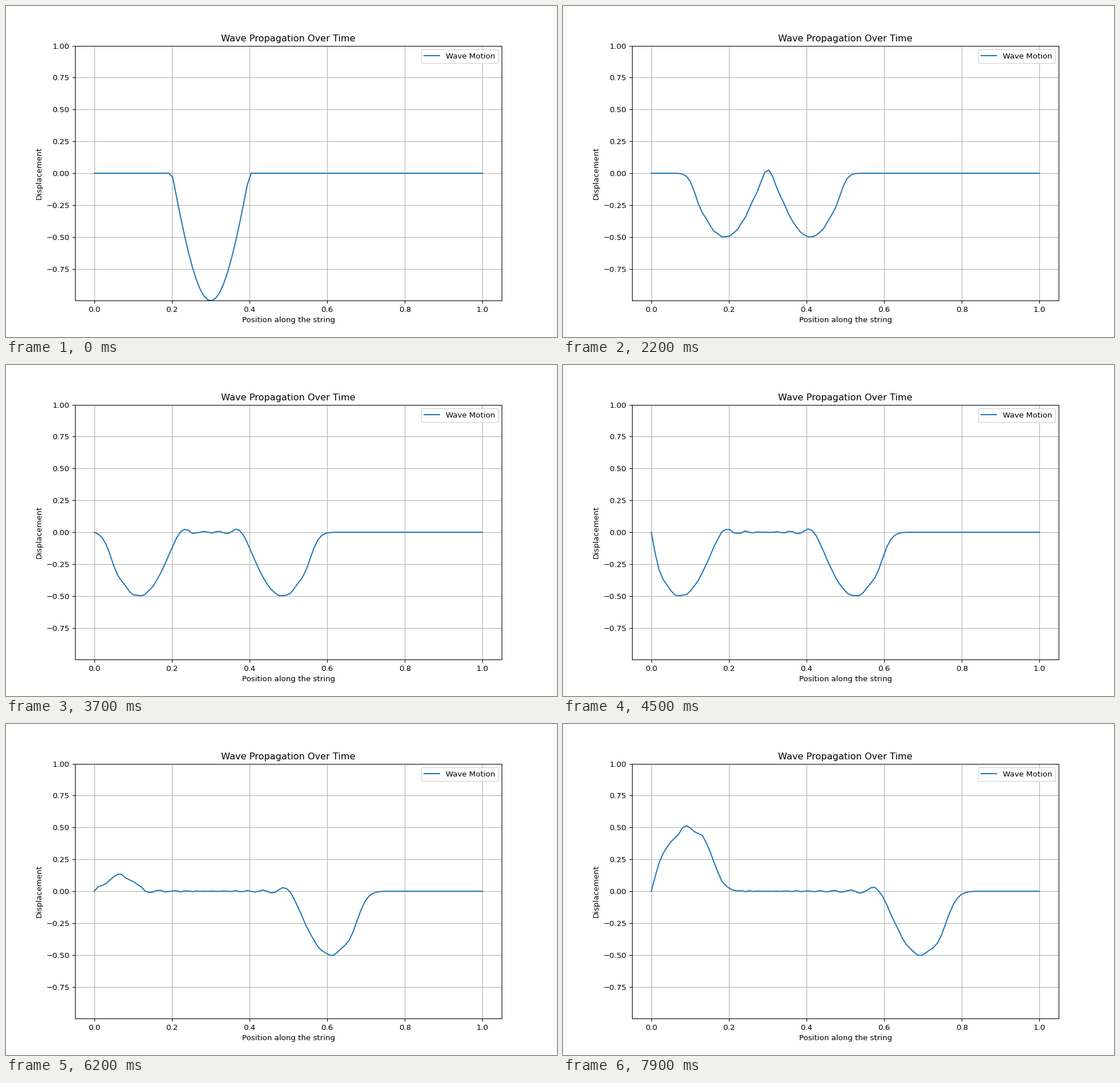
These frames come from a looping animation (966x580 px, 8 s). A matplotlib script:

```python
import numpy as np
import matplotlib.pyplot as plt
from matplotlib.animation import FuncAnimation

WIDTH, HEIGHT, DPI = 966, 580, 96.6
POINTS, FRAMES = 100, 80
SPEED, DT, SUBSTEPS = 1.0, 0.001, 5

x = np.linspace(0, 1, POINTS)
r2 = (SPEED * DT / (x[1] - x[0])) ** 2


def bend(u):
    """Second difference with both ends held still."""
    d = np.zeros_like(u)
    d[1:-1] = u[2:] - 2 * u[1:-1] + u[:-2]
    return d


# Explicit finite-difference solution of the wave equation, released at rest
steps = FRAMES * SUBSTEPS
u = np.zeros((steps, POINTS))
u[0] = np.where((x >= 0.2) & (x <= 0.4), np.sin(5 * np.pi * x), 0)
u[1] = u[0] + 0.5 * r2 * bend(u[0])
for n in range(1, steps - 1):
    u[n + 1] = 2 * u[n] - u[n - 1] + r2 * bend(u[n])
waves = u[::SUBSTEPS]

# The small margin keeps the pixel size from rounding down
fig, ax = plt.subplots(figsize=((WIDTH + 0.01) / DPI, (HEIGHT + 0.01) / DPI),
                       dpi=DPI)
line, = ax.plot(x, waves[0], label="Wave Motion")
ax.set_xlim(-0.05, 1.05)
ax.set_ylim(waves[0].min(), 1)
ax.set_xlabel("Position along the string")
ax.set_ylabel("Displacement")
ax.set_title("Wave Propagation Over Time")
ax.legend(loc="upper right")
ax.grid(True)


def update(n):
    line.set_ydata(waves[n])
    return line,


anim = FuncAnimation(fig, update, frames=FRAMES, interval=100,
                     repeat=True, repeat_delay=0)
plt.show()
```
